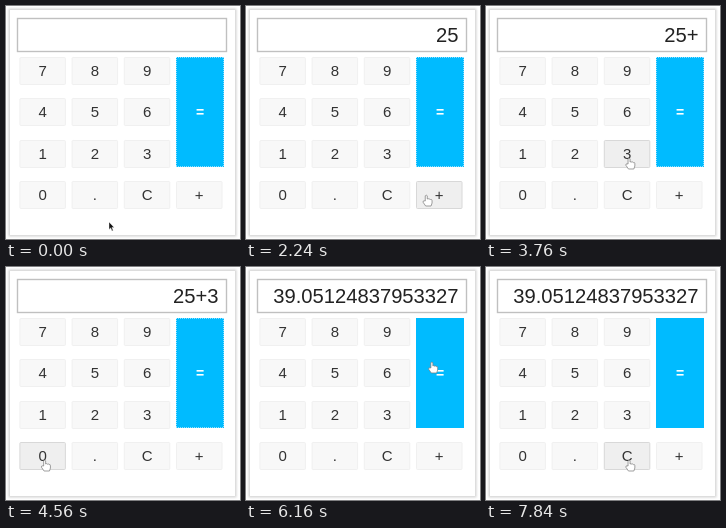
Animation, 234 px wide and 233 px high, one loop 8000 ms. Source, as an HTML page:

```html
<!DOCTYPE html>
<html lang="en">
<head>
<meta charset="utf-8">
<title>Calculator</title>
<style>
  html, body { margin: 0; height: 100%; overflow: hidden; background: #fff; }
  svg { display: block; width: 100vw; height: 100vh; }
  text { font: 15px "Liberation Sans", Arial, sans-serif; text-anchor: middle; fill: #333; }
  #display { font-size: 20.2px; text-anchor: end; fill: #222; }
  .key rect { fill: #f8f8f8; stroke: #f0f0f0; }
  .key.hover rect { fill: #efefef; stroke: #d8d8d8; }
  .key.equals rect { fill: #00bbff; stroke: none; }
  .key.equals text { fill: #fff; font-size: 14px; font-weight: bold; }
</style>
</head>
<body>
<svg viewBox="0 0 234 233">
  <defs>
    <filter id="soft" x="-5%" y="-5%" width="110%" height="110%"><feGaussianBlur stdDeviation="1.3"/></filter>
  </defs>
  <rect x="2.5" y="2.5" width="228" height="228" fill="#d4d4d4" filter="url(#soft)"/>
  <rect x="4" y="4" width="225" height="225" fill="#fff"/>
  <rect x="11.5" y="12.5" width="209" height="33" fill="#fff" stroke="#c0c0c0" stroke-width="1.4"/>
  <text id="display" x="212.5" y="36"></text>
  <g id="keys"></g>
  <path id="focus" d="M170 51.5H218M170 160.5H218M170.5 51V161M217.5 51V161"
    stroke="#fff" stroke-opacity=".55" stroke-dasharray="1 1"/>
  <path id="arrow" fill="#111" stroke="#fff" stroke-width=".4" d="M0 0V7.4L1.7 5.9L3 8.9L4.2 8.4L2.9 5.4H5.2Z"/>
  <path id="hand" fill="#fff" stroke="#777" stroke-width=".7" stroke-linejoin="round"
    d="M-1 6V.8Q0 -.5 1 .8V4Q2 3.2 2.8 4.2Q3.8 3.5 4.4 4.6Q5.8 4.2 5.8 5.6V8L4.8 11H-.6L-3.2 7.2Q-3.4 5.6 -2 5.8Z"/>
</svg>
<script>
const LOOP = 8000, STEP = 80;
const $ = id => document.getElementById(id);

const cell = (label, col, row) =>
  ({ label, x: 13.4 + 52.2 * col, y: Math.round(51 + 41.4 * row), w: 46.5, h: 28 });
const keys = ["789", "456", "123", "0.C+"].flatMap((labels, row) =>
  [...labels].map((label, col) => cell(label, col, row)));
keys.push({ label: "=", x: 170, y: 51, w: 48, h: 110 });

$("keys").innerHTML = keys.map(k => `<g class="key ${k.label === "=" ? "equals" : ""}">
  <rect x="${k.x + .5}" y="${k.y + .5}" width="${k.w - 1}" height="${k.h - 1}" rx="1"/>
  <text x="${k.x + k.w / 2}" y="${k.y + k.h / 2 + 5}">${k.label}</text></g>`).join("");
const keyNodes = [...$("keys").children];
const equalsRect = document.querySelector(".equals rect");
for (const [name, value] of Object.entries({ x: 170, y: 51, width: 48, height: 110, rx: 0 }))
  equalsRect.setAttribute(name, value);

// The pointer rests slightly off the centre of each key it visits.
const visit = (label, arrive, press, dx = 2, dy = 4) => {
  const k = keys.find(k => k.label === label);
  return { label, arrive, press, x: k.x + k.w / 2 + dx, y: k.y + k.h / 2 + dy };
};
const visits = [
  { label: "", arrive: 0, press: 0, x: 103, y: 216 },
  visit("2", 1200, 1600, 9, -8),
  visit("5", 1760, 1840),
  visit("+", 2240, 2640, -13, 0),
  visit("3", 3520, 3840),
  visit("0", 4560, 4720),
  visit("=", 5440, 6000, 0, -13),
  visit("C", 7040, LOOP)
];

// Sideways motion runs ahead of vertical motion, which bends the path.
function pointerAt(t) {
  const i = visits.findLastIndex(v => v.press + STEP <= t);
  const a = visits[Math.max(i, 0)], b = visits[Math.max(i, 0) + 1];
  const leave = a.press + STEP;
  const p = Math.min(Math.max((t - leave) / (b.arrive - leave), 0), 1);
  return [a.x + (b.x - a.x) * p * (2 - p), a.y + (b.y - a.y) * p * p * (3 - 2 * p)];
}

const evaluate = sum => String(Math.sqrt(sum.split("+").reduce((total, n) => total + n * n, 0)));
const displayAt = t => visits.filter(v => v.press <= t)
  .reduce((text, v) => v.label === "=" ? evaluate(text) : text + v.label, "");

function draw(now) {
  const t = Math.min(Math.floor(now % LOOP / STEP) * STEP, LOOP - 2 * STEP);
  const [x, y] = pointerAt(t);
  const hovered = keys.findIndex(k => x >= k.x && x < k.x + k.w && y >= k.y && y < k.y + k.h);
  keyNodes.forEach((node, i) => node.classList.toggle("hover", i === hovered));
  for (const id of ["arrow", "hand"]) {
    $(id).setAttribute("transform", `translate(${x} ${y})`);
    $(id).style.display = (id === "hand") === (hovered >= 0) ? "" : "none";
  }
  $("display").textContent = displayAt(t);
  $("focus").style.display = t < 6000 ? "" : "none";
}

function tick() {
  draw(performance.now());
  requestAnimationFrame(tick);
}
tick();
</script>
</body>
</html>
```
